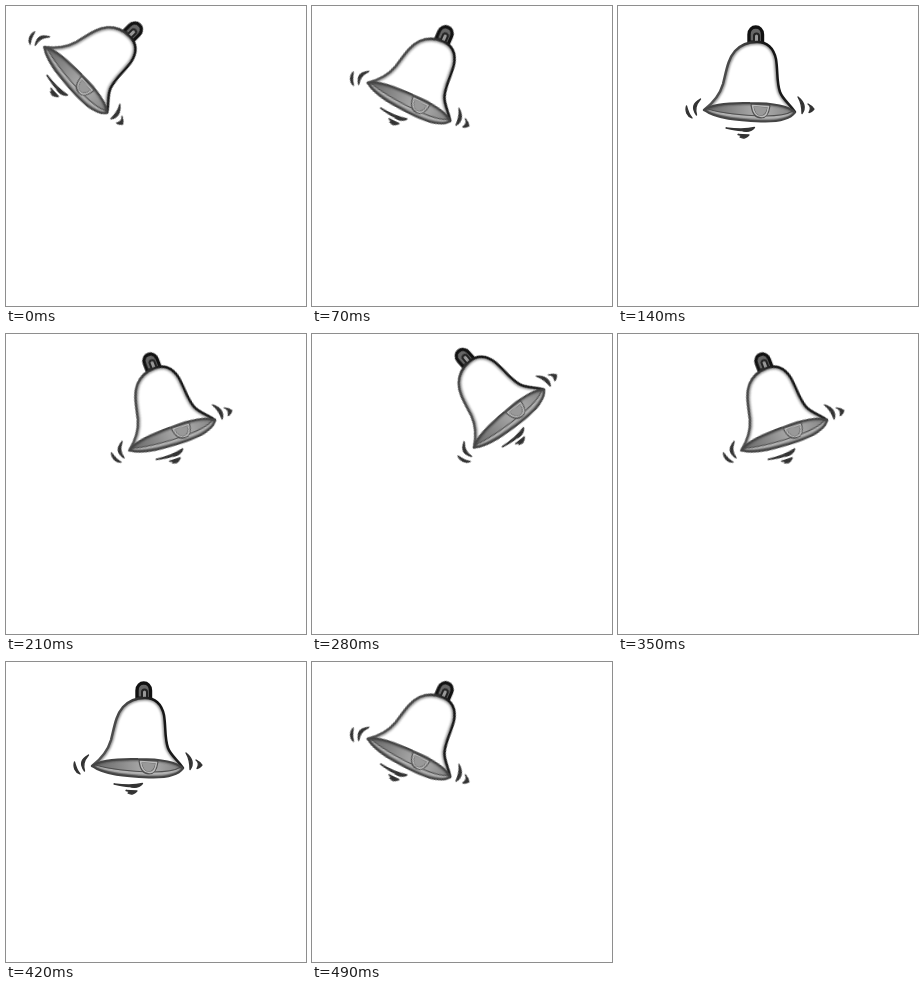
Recreate the animation shown at these times as an HTML page. Size 300 by 300 pixels, loop 560 ms.

```html
<!DOCTYPE html>
<html lang="en">
<head>
<meta charset="utf-8">
<title>Ringing bell</title>
<style>
  html, body { margin: 0; width: 100%; height: 100%; overflow: hidden; background: #fff; }
  svg { display: block; width: 100vw; height: 100vh; }
  path { stroke-linecap: round; stroke-linejoin: round; }
</style>
</head>
<body>
<svg viewBox="0 0 300 300">
  <defs>
    <path id="shell" d="M86 104C95 97 101.500 90 105 78C108.500 64 110 53 117 45C123 38.500 131 36 139 36C149 36 155.500 42 158 53C160 65 158.500 76 162 86C165 94 172 98 177 106Z"/>
    <path id="mouth" d="M86 104C94 98 111 96.500 132 97C153 97 170 99 177 106.500C172 113.500 158 116 143 115.500C120 114.500 98 113 86 104Z"/>
    <clipPath id="inShell"><use href="#shell"/></clipPath>
    <clipPath id="inMouth"><use href="#mouth"/></clipPath>
    <filter id="soft" x="-20%" y="-20%" width="140%" height="140%"><feGaussianBlur stdDeviation="1.200"/></filter>
    <linearGradient id="metal">
      <stop offset="0" stop-color="#666"/>
      <stop offset=".3" stop-color="#888"/>
      <stop offset=".62" stop-color="#b0b0b0"/>
      <stop offset="1" stop-color="#808080"/>
    </linearGradient>
    <linearGradient id="edge">
      <stop offset="0" stop-color="#555"/>
      <stop offset=".4" stop-color="#444"/>
      <stop offset=".7" stop-color="#111"/>
      <stop offset="1" stop-color="#222"/>
    </linearGradient>
  </defs>

  <!-- Drawn upright; the mouth's centre (132, 106) is the local origin. -->
  <g id="bell">
    <g transform="translate(-132 -106)">
      <path d="M131 36V28.500C131 18.500 144.500 18.500 144.500 28.500V37Z" fill="#666" stroke="#111" stroke-width="3.400"/>
      <path d="M136 35V30C136 26.500 141 26.500 141 30V35" fill="#999" stroke="#222" stroke-width="2"/>

      <use href="#shell" fill="#fff"/>
      <g clip-path="url(#inShell)">
        <use href="#shell" fill="none" stroke="#888" stroke-width="5" filter="url(#soft)"/>
      </g>
      <use href="#shell" fill="none" stroke="url(#edge)" stroke-width="2.500"/>

      <use href="#mouth" fill="url(#metal)"/>
      <g clip-path="url(#inMouth)">
        <path d="M89 104C106 110 128 111.500 147 111.500C160 112 170 110 176 106" fill="none" stroke="#b4b4b4" stroke-width="2.500"/>
        <path d="M90 103C106 108 128 109.500 147 110C160 110 170 108 175 105" fill="none" stroke="#505050" stroke-width="1.200"/>
        <use href="#mouth" fill="none" stroke="#444" stroke-width="3" filter="url(#soft)"/>
      </g>
      <g fill="none">
        <path d="M134 99C135 107 138 111 143 111C148 111 150 107 151 100Z" fill="#999" stroke="#505050" stroke-width="3"/>
        <path d="M134.500 99.500C135.500 107 138 110.500 143 110.500C148 110.500 149.500 107 150.500 100.500Z" stroke="#bbb" stroke-width="1.600"/>
      </g>
      <use href="#mouth" fill="none" stroke="#444" stroke-width="2"/>

      <g fill="#333" stroke="#333" stroke-width="1.300">
        <path d="M82.500 93C75 97 73.500 102 78.500 109C77 103 77.500 99 82.500 93Z"/>
        <path d="M68.500 100C67 105 69 110 74 112C70.500 108 69.500 104 68.500 100Z"/>
        <path d="M180 91C183 96 184 101 184 107.500C188 102 186 96 180 91Z"/>
        <path d="M190 98C193 100 193 103 191 106.500C194 106 195 104 196 103C194 100 192 99 190 98Z"/>
        <path d="M108 122C117 123 127 124 136.500 121.500C133 126 128 126 123 124.500C118 124 113 123 108 122Z"/>
        <path d="M120 128.500C124 129 127 129 131 129C129 132 125 133 122 131C125 130 123 129 120 128.500Z"/>
      </g>
    </g>
  </g>
</svg>
<script>
  const STEP = 70;
  // x, y, degrees from far left to far right
  const poses = [
    [69.3, 75, 45],
    [97, 97, 23.5],
    [132, 106, 0],
    [167, 102, -20.8],
    [198, 85, -41],
  ];
  const swing = [0, 1, 2, 3, 4, 3, 2, 1];

  const frames = swing.map((pose, i) => {
    const [x, y, angle] = poses[pose];
    return {
      offset: i / swing.length,
      easing: 'step-end',
      transform: `translate(${x}px, ${y}px) rotate(${angle}deg)`,
    };
  });
  frames.push({ ...frames[0], offset: 1 });

  document.getElementById('bell').animate(frames, {
    duration: STEP * swing.length,
    iterations: Infinity,
  });
</script>
</body>
</html>
```
